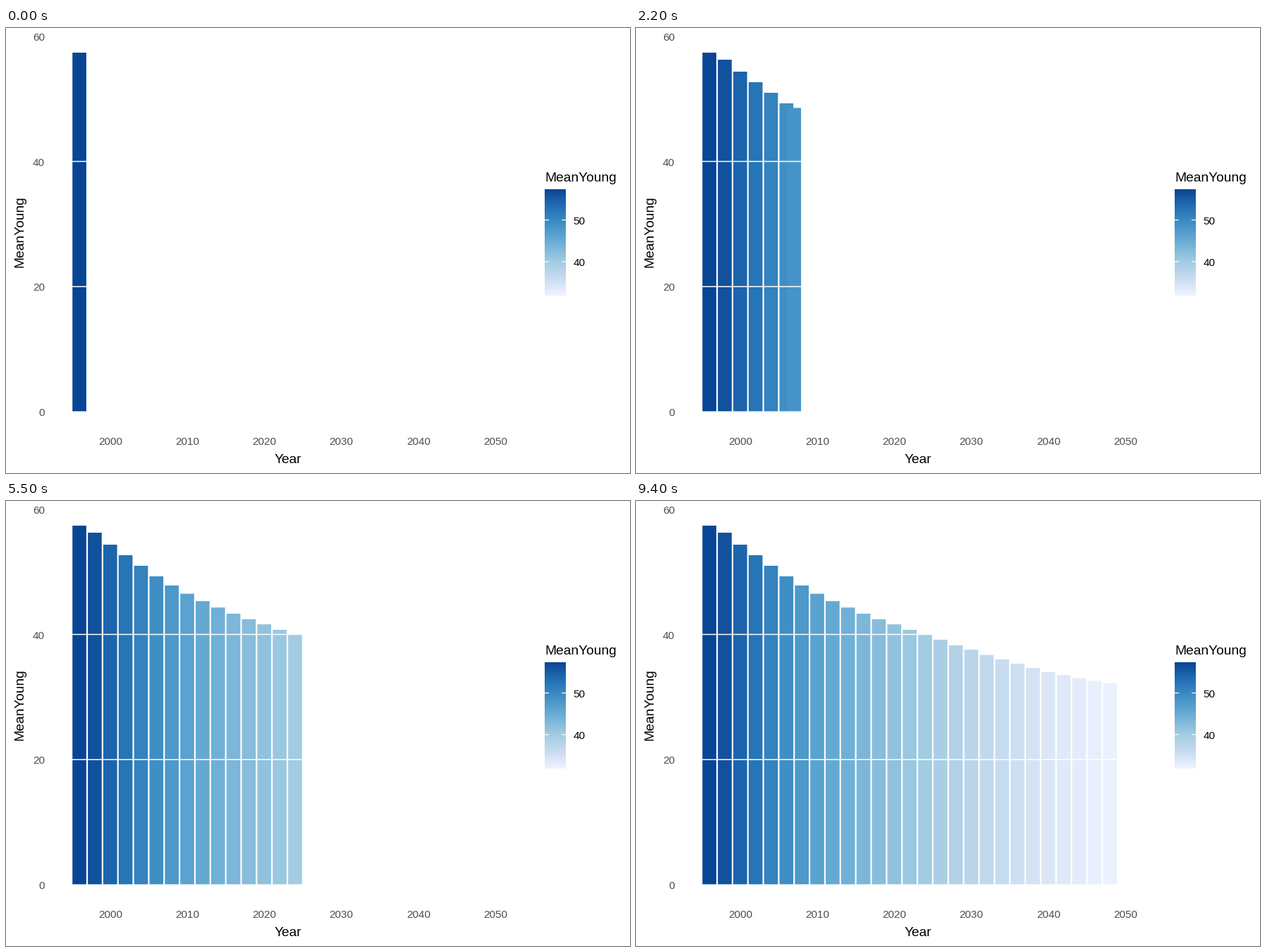
Recreate the animation shown at these times as a matplotlib script. Size 885 by 632 pixels, loop 10 s.

```python
import numpy as np
import matplotlib.pyplot as plt
from matplotlib.animation import FuncAnimation
from matplotlib.patches import Rectangle

W, H, DPI = 885, 632, 100
FIRST, LAST = 1996, 2048
X2000, PX_YEAR = 147.77, 10.925
Y_ZERO, PX_UNIT = 545.1, 8.89
V_MIN, V_MAX = 31.85, 57.4

# Bar tops in pixels, one bar every two years
TOPS = [35, 45, 62, 77, 92, 107, 120, 131.7, 142.2, 151.3, 160, 168, 175.2,
        183, 190, 197, 205, 211.2, 218.7, 225, 231, 237, 243, 247, 251.5,
        255.4, 258.7]
BLUES = ["EFF3FF", "C6DBEF", "9ECAE1", "6BAED6", "4292C6", "2171B5", "084594"]

# Linear sRGB to XYZ, scaled by the D65 white point
TO_XYZ = np.array([[.4124, .3576, .1805], [.2126, .7152, .0722],
                   [.0193, .1192, .9505]]) / [[.9505], [1], [1.089]]
TO_LAB = np.array([[0, 1.16, 0], [5, -5, 0], [0, 2, -2]])


def to_lab(rgb):
    lin = np.where(rgb > .04045, ((rgb + .055) / 1.055) ** 2.4, rgb / 12.92)
    return TO_LAB @ np.cbrt(TO_XYZ @ lin)


def to_rgb(lab):
    lin = np.linalg.solve(TO_XYZ, np.linalg.solve(TO_LAB, lab) ** 3)
    lin = np.clip(lin, 0, 1)
    return np.where(lin > .0031308, 1.055 * lin ** (1 / 2.4) - .055, 12.92 * lin)


STOPS = np.array([to_lab(np.array([int(h[i:i + 2], 16) for i in (0, 2, 4)]) / 255)
                  for h in BLUES])


def fill(value):
    p = (value - V_MIN) / (V_MAX - V_MIN)
    grid = np.linspace(0, 1, len(STOPS))
    lab = np.array([np.interp(p, grid, STOPS[:, c]) for c in range(3)])
    return np.clip(to_rgb(lab), 0, 1)


def year_x(year):
    return X2000 + (year - 2000) * PX_YEAR


def px(n):
    return n * 72 / DPI


plt.rcParams["font.family"] = "Liberation Sans"
fig = plt.figure(figsize=(W / DPI, H / DPI), dpi=DPI, facecolor="white")
ax = fig.add_axes([0, 0, 1, 1])
ax.axis("off")


def label(x, y, s, size=15.28, color="black", **kw):
    ax.text(x, y, s, fontsize=px(size), color=color, va="baseline", **kw)


def rule(x0, x1, y, width):
    ax.plot([x0, x1], [y, y], color="white", lw=px(width), snap=False,
            solid_capstyle="butt", zorder=4)


def set_bar(bar, year):
    top = np.interp(year, range(FIRST, LAST + 1, 2), TOPS)
    bar.set_bounds(year_x(year) - .9 * PX_YEAR, top, 1.8 * PX_YEAR, Y_ZERO - top)
    bar.set_facecolor(fill((Y_ZERO - top) / PX_UNIT))


def new_bar(year, z):
    bar = ax.add_patch(Rectangle((0, 0), 1, 1, lw=0, zorder=z, snap=False))
    set_bar(bar, year)
    return bar


bars = {y: new_bar(y, 2) for y in range(FIRST, LAST + 1, 2)}
moving = new_bar(FIRST, 3)

# Axes
for v in (0, 20, 40, 60):
    y = Y_ZERO - v * PX_UNIT
    label(55, y + 6, str(v), color="#4D4D4D", ha="right")
    rule(60, 740, y, 1.5)
for year in range(2000, 2051, 10):
    label(year_x(year), 592.5, str(year), color="#4D4D4D", ha="center")
label(399.5, 617.5, "Year", 19.1, ha="center")
label(24, 289, "MeanYoung", 19.1, ha="center", rotation=90,
      rotation_mode="anchor")

# Colour legend
label(764.2, 218, "MeanYoung", 19.1, ha="left")
ramp = np.array([[fill(v)] for v in np.linspace(V_MAX, V_MIN, 151)])
ax.imshow(ramp, extent=(764, 794, 380, 229), aspect="auto",
          interpolation="nearest", zorder=2)
for v, y in ((50, 272.6), (40, 331.8)):
    rule(764, 770, y, 1.2)
    rule(788, 794, y, 1.2)
    label(804.2, y + 6.4, str(v), ha="left")

ax.set_xlim(0, W)
ax.set_ylim(H, 0)


def year_at(i):
    # Half steps up to 2030, then whole bars only
    if i >= 70:
        return min(2032 + 2 * ((i - 70) // 3), LAST)
    k, phase = divmod(i - 2, 4)
    return FIRST + 2 * k + (1 if phase == 0 else 2)


def update(i):
    now = year_at(i)
    for year, bar in bars.items():
        bar.set_visible(year <= now)
    moving.set_visible(now % 2 == 1)
    if now % 2:
        set_bar(moving, now)
    return [*bars.values(), moving]


anim = FuncAnimation(fig, update, frames=100, interval=100, repeat=True,
                     repeat_delay=0, blit=False)
plt.show()
```
